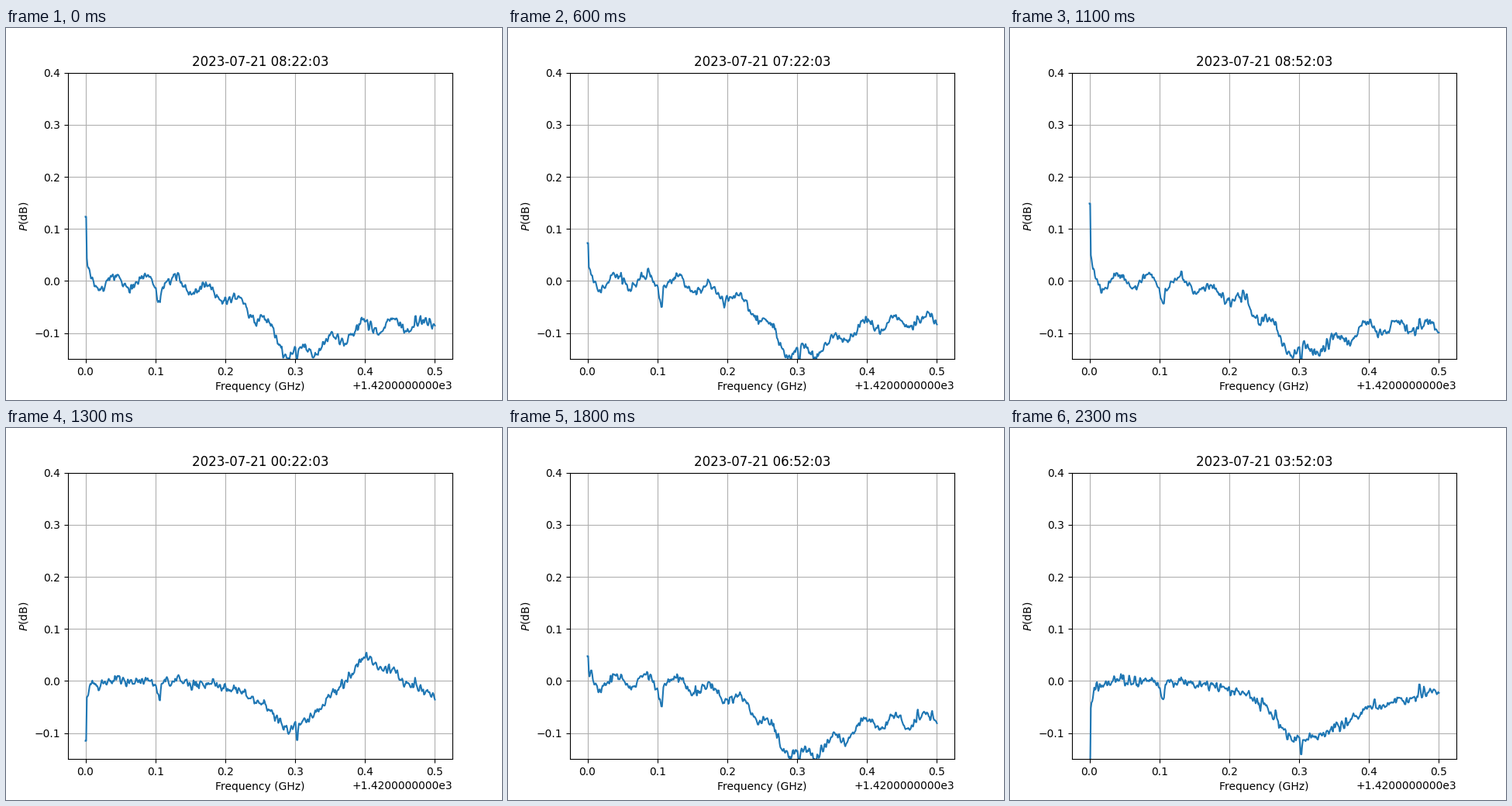
A matplotlib script for the animation above (2400 ms loop, 640 by 480 pixels).

```python
import numpy as np
import matplotlib.pyplot as plt
from matplotlib.animation import FuncAnimation

STEP = 100    # ms per frame
FRAMES = 24   # the first spectrum is held for two frames

# Half-hour slots after 00:22:03, in playing order
ORDER = [16, 5, 12, 19, 2, 14, 9, 22, 21, 4, 17, 10, 0, 8, 20, 11, 3, 13, 6, 18, 1, 15, 7]

# Drift of the band shape: key levels in mdB at a few slots, blended in between.
# Each row starts with the level of the first channel.
KNOTS = [.13, .22, .25, .29, .33, .40, .50]
DRIFT = {
    0: [-115, 0, -16, -38, -94, -62, 46, -30],
    7: [-170, 0, -21, -45, -113, -107, -52, -18],
    11: [-3, 0, -38, -70, -142, -136, -78, -62],
    18: [174, -1, -39, -72, -136, -128, -90, -90],
    21: [189, 11, 13, -20, -92, -98, -77, -70],
}
RIPPLE_PERIOD = 0.0444
RIPPLE_PEAK = 0.040

x = np.linspace(0, 0.5, 512)
shared_noise = np.random.default_rng(7).normal(0, 1, x.size)


def tent(left, peak, right):
    return np.interp(x, [left, peak, right], [0, 1, 0])


def ripple(slot):
    height = np.interp(slot, [7, 11], [2, 12])
    return height * np.cos(2 * np.pi * (x - RIPPLE_PEAK) / RIPPLE_PERIOD)


def jitter(slot):
    own = np.random.default_rng(100 + slot).normal(0, 1, x.size)
    mixed = 0.65 * shared_noise + 0.75 * own
    return np.convolve(mixed, [0.35, 0.8, 0.35], mode="same")


def spectrum(slot):
    start, *levels = [np.interp(slot, list(DRIFT), col) for col in zip(*DRIFT.values())]
    y = np.interp(x, KNOTS, levels) + ripple(slot) + 5.3 * jitter(slot)

    # Narrow lines
    y -= 36 * tent(.097, .1065, .109)
    y -= 32 * tent(.3005, .303, .3055)
    y += 18 * tent(.4705, .472, .4735)

    # Transient at the band edge
    y += 0.45 * start * np.exp(-x / .005)
    y[:2] = start
    return y / 1000


def stamp(slot):
    hour, minute = divmod(22 + 30 * slot, 60)
    return f"2023-07-21 {hour:02d}:{minute:02d}:03"


curves = {slot: spectrum(slot) for slot in ORDER}

fig, ax = plt.subplots(figsize=(6.4, 4.8), dpi=100)
line, = ax.plot(x, curves[ORDER[0]])
title = ax.set_title(stamp(ORDER[0]))
ax.set_xlim(-0.025, 0.525)
ax.set_ylim(-0.15, 0.4)
ax.set_xlabel("Frequency (GHz)")
ax.set_ylabel("$P$(dB)")
ax.xaxis.get_major_formatter().get_offset = lambda: "+1.4200000000e3"
ax.grid()


def update(frame):
    slot = ORDER[max(frame - 1, 0)]
    line.set_ydata(curves[slot])
    title.set_text(stamp(slot))
    return line, title


anim = FuncAnimation(fig, update, frames=FRAMES, interval=STEP, repeat=True, repeat_delay=0)
plt.show()
```
